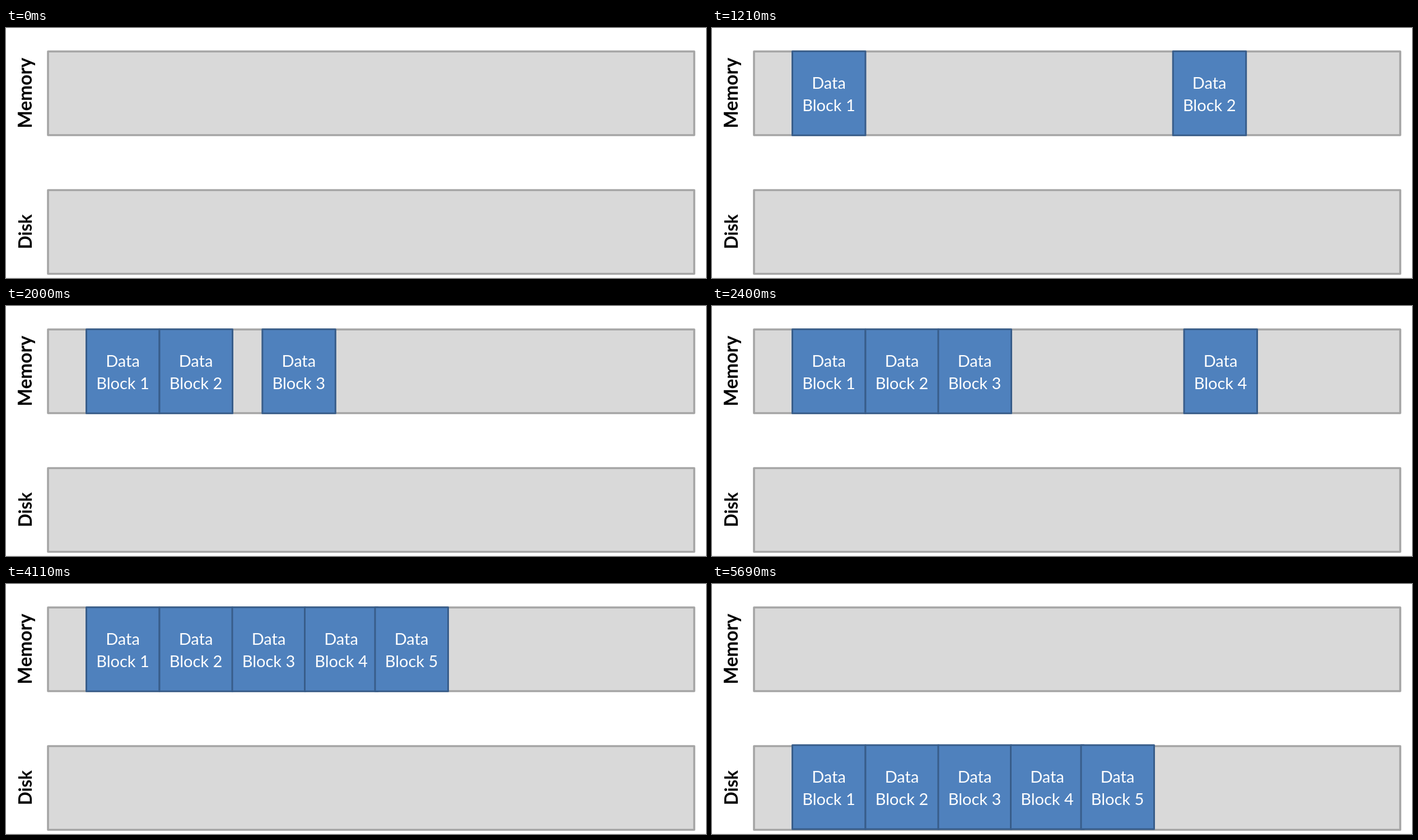
Recreate the animation shown at these times as an HTML page. Size 1250x448 px, loop 9370 ms.

```html
<!DOCTYPE html>
<html lang="en">
<head>
<meta charset="utf-8">
<title>Data blocks from memory to disk</title>
<style>
  html, body { margin: 0; width: 100%; height: 100%; overflow: hidden; background: #fff; }
  svg { display: block; width: 100%; height: 100%; font-family: Lato, sans-serif; text-anchor: middle; }
  .bar { fill: #d9d9d9; stroke: #a5a5a5; stroke-width: 3.6; stroke-linejoin: round; }
  .label { font-weight: 700; fill: #000; }
  .block rect { fill: #4f81bd; stroke: #385d8a; stroke-width: 3; stroke-linejoin: round; }
  .block text { fill: #fff; font-size: 29px; }
</style>
</head>
<body>
<svg viewBox="0 0 1250 448">
  <rect y="446.5" width="1250" height="1" fill="#f0f0f0"/>
  <rect class="bar" x="75" y="42" width="1154" height="150"/>
  <rect class="bar" x="75" y="290.5" width="1154" height="150"/>
  <text class="label" font-size="33.5" transform="translate(46 116.5) rotate(-90)">Memory</text>
  <text class="label" font-size="31.5" transform="translate(46 365) rotate(-90)">Disk</text>
  <g id="blocks"></g>
</svg>
<script>
const LOOP = 9370;
const OFFSTAGE = 1252;
const FLY_TIME = 520;
const DROP = { start: 4110, time: 1000, distance: 247, ramp: 0.32 };

const blocks = [
  { x: 143.5, start: 435 },
  { x: 274, start: 983 },
  { x: 404, start: 1514 },
  { x: 533.5, start: 2105 },
  { x: 659, start: 2650 }
];

const group = document.getElementById('blocks');
group.innerHTML = blocks.map((_, i) => `
  <g class="block">
    <rect y="41.7" width="130.5" height="150.6"/>
    <text x="65" y="109">Data</text>
    <text x="65" y="148.5">Block ${i + 1}</text>
  </g>`).join('');

const progress = (t, start, time) => Math.min(1, Math.max(0, (t - start) / time));

// Speeds up evenly, cruises, then slows down evenly.
function smooth(p, ramp) {
  if (p > 0.5) return 1 - smooth(1 - p, ramp);
  const speed = 1 / (1 - ramp);
  return p < ramp ? speed * p * p / (2 * ramp) : speed * (p - ramp / 2);
}

function draw(t) {
  blocks.forEach(({ x, start }, i) => {
    const p = progress(t, start, FLY_TIME);
    const left = OFFSTAGE + (x - OFFSTAGE) * p;
    group.children[i].setAttribute('transform', `translate(${left} 0)`);
  });
  const fall = DROP.distance * smooth(progress(t, DROP.start, DROP.time), DROP.ramp);
  group.setAttribute('transform', `translate(0 ${fall})`);
}

const origin = performance.now();
function tick() {
  draw((performance.now() - origin) % LOOP);
  requestAnimationFrame(tick);
}
tick();
</script>
</body>
</html>
```
